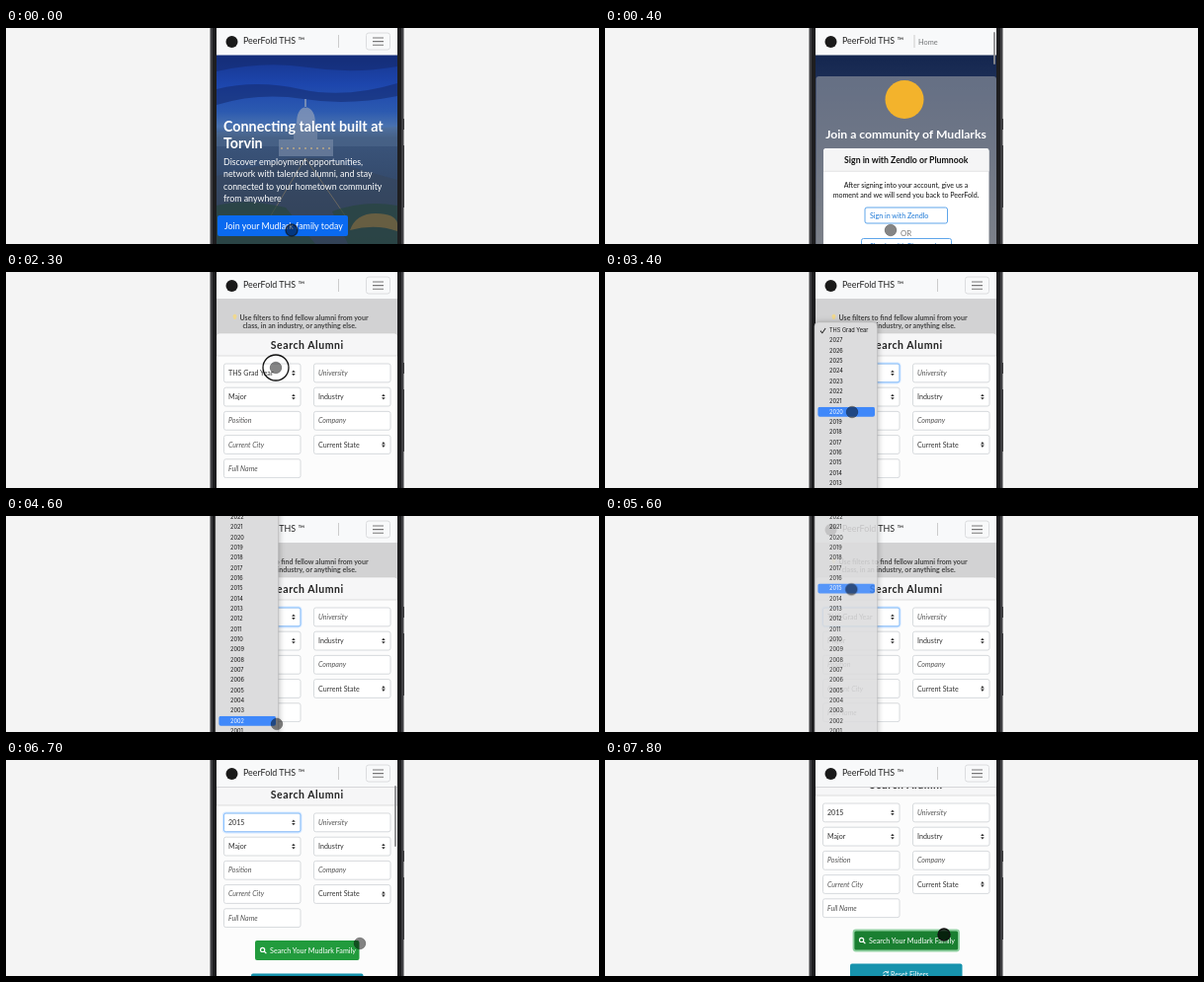
An HTML page for the animation above (8000 ms loop, 600 px wide and 219 px high).

```html
<!DOCTYPE html>
<html lang="en">
<head>
<meta charset="utf-8">
<title>Alumni search walkthrough</title>
<style>
@property --cx { syntax: "<number>"; inherits: true; initial-value: 289 }
@property --cy { syntax: "<number>"; inherits: true; initial-value: 205 }
@property --scroll { syntax: "<number>"; inherits: true; initial-value: 0 }
@property --list { syntax: "<number>"; inherits: true; initial-value: 0 }
@property --row { syntax: "<number>"; inherits: true; initial-value: 100.3 }

html, body { margin: 0; width: 100%; height: 100%; overflow: hidden; background: #f4f4f4 }
svg {
  display: block; width: 600px; height: 219px;
  font: 7.1px Lato, "Open Sans", sans-serif;
  animation: x 8s linear infinite, y 8s linear infinite, scroll 8s linear infinite,
    list 8s linear infinite, row 8s linear infinite;
}
.b { font-weight: 700 }
.i { font-style: italic; fill: #555 }
.m { text-anchor: middle }
.w { fill: #fff }

@keyframes x {
  0%, 6.25% { --cx: 289 }
  10%, 13.75% { --cx: 300 }
  18.75%, 23.75% { --cx: 341 }
  28%, 35% { --cx: 273 }
  42.5%, 50% { --cx: 250 }
  51.25%, 57.5% { --cx: 274 }
  67.5%, 70% { --cx: 249 }
  75%, 77.5% { --cx: 361 }
  80%, 85% { --cx: 358 }
  92.5%, 100% { --cx: 343 }
}
@keyframes y {
  0%, 6.25% { --cy: 205 }
  10%, 13.75% { --cy: 192 }
  18.75%, 23.75% { --cy: 205 }
  28%, 35% { --cy: 97 }
  42.5%, 45% { --cy: 142 }
  47.5%, 50% { --cy: 163 }
  51.25%, 57.5% { --cy: 211 }
  67.5%, 70% { --cy: 74 }
  75%, 77.5% { --cy: 206 }
  80%, 85% { --cy: 186 }
  92.5%, 100% { --cy: 177 }
}
@keyframes scroll {
  0%, 81.25% { --scroll: 0 }
  83.75% { --scroll: -39; animation-timing-function: ease-out }
  92.5%, 100% { --scroll: -49 }
}
@keyframes list {
  0%, 50% { --list: 0 }
  53.75%, 100% { --list: -120 }
}
@keyframes row {
  0% { --row: 100.3 }
  35% { --row: 100.3; animation-timing-function: steps(4) }
  42.5% { --row: 141.6 }
  45% { --row: 141.6; animation-timing-function: steps(2) }
  47.5%, 50% { --row: 162.3 }
  53.75% { --row: 207.6 }
  57.5% { --row: 207.6; animation-timing-function: steps(13) }
  67.5%, 100% { --row: 73.3 }
}

#cursor { transform: translate(calc(var(--cx) * 1px), calc(var(--cy) * 1px)) }
#content { transform: translateY(calc(var(--scroll) * 1px)) }
#sheet { transform: translateY(calc(var(--list) * 1px)) }
#mark { transform: translateY(calc(var(--row) * 1px)); animation: mark 8s step-end infinite }
#mark use { transform: translateY(calc((var(--list) - var(--row)) * 1px)) }
@keyframes mark { 0%, 53.75% { opacity: 1 } 50% { opacity: 0 } }

#landing { animation: landing 8s step-end infinite }
@keyframes landing { 0% { visibility: visible } 1.25%, 100% { visibility: hidden } }
#signin { animation: signin 8s step-end infinite }
@keyframes signin { 0% { visibility: visible } 12.5%, 100% { visibility: hidden } }

#menu { animation: menu 8s linear infinite; filter: drop-shadow(0 1px 3px #0005) }
@keyframes menu {
  0%, 32.49% { opacity: 0 }
  32.5%, 69% { opacity: 1 }
  70% { opacity: .88 }
  72.5%, 100% { opacity: 0 }
}
#before { animation: before 8s step-end infinite }
@keyframes before { 0% { opacity: 1 } 71.25%, 100% { opacity: 0 } }
#after { animation: after 8s step-end infinite }
@keyframes after { 0% { opacity: 0 } 71.25%, 100% { opacity: 1 } }
#focus { animation: focus 8s step-end infinite }
@keyframes focus { 0% { opacity: 0 } 32.5% { opacity: 1 } 95%, 100% { opacity: 0 } }
#press { animation: press 8s step-end infinite }
@keyframes press { 0% { opacity: 0 } 95%, 100% { opacity: 1 } }

#bar1 { animation: bar1 8s linear infinite }
@keyframes bar1 { 0%, 7% { opacity: 1 } 11.25%, 100% { opacity: 0 } }
#bar2 { animation: bar2 8s linear infinite }
@keyframes bar2 { 0%, 82% { opacity: 0 } 82.5%, 89% { opacity: 1 } 92.5%, 100% { opacity: 0 } }

#ring { fill: none; stroke: #111; stroke-width: 1.3; animation: ring 8s linear infinite }
@keyframes ring {
  0% { r: 6px; opacity: .6 }
  1.25%, 9.5% { r: 6px; opacity: 0 }
  10% { r: 6px; opacity: 1 }
  11.25% { r: 13px; opacity: 1 }
  12.5%, 27.4% { r: 6px; opacity: 0 }
  27.5% { r: 6px; opacity: 1 }
  28.75%, 30% { r: 13px; opacity: 1 }
  31.25%, 96.8% { r: 6px; opacity: 0 }
  97%, 100% { r: 6px; opacity: 1 }
}
#dot { animation: dot 8s step-end infinite }
@keyframes dot { 0% { fill-opacity: .48 } 97%, 100% { fill-opacity: .72 } }
</style>
</head>
<body>
<svg viewBox="0 0 600 219">
  <defs>
    <linearGradient id="sky" x2="0" y2="1">
      <stop offset="0" stop-color="#16348c"/>
      <stop offset=".16" stop-color="#1d46ad"/>
      <stop offset=".3" stop-color="#2c5ab0"/>
      <stop offset=".38" stop-color="#4a72ae"/>
      <stop offset=".44" stop-color="#3b557c"/>
      <stop offset=".7" stop-color="#33496a"/>
      <stop offset="1" stop-color="#2b3b4e"/>
    </linearGradient>
    <linearGradient id="dusk" x2="0" y2="1">
      <stop offset="0" stop-color="#14264f"/>
      <stop offset=".12" stop-color="#1b2d55"/>
      <stop offset="1" stop-color="#4d535f"/>
    </linearGradient>
    <clipPath id="screen"><path d="M213 0h183v219h-183z"/></clipPath>
    <clipPath id="line"><rect x="215.4" y="-4.9" width="57.6" height="10" rx="2"/></clipPath>
    <g id="brand">
      <path d="M213 0h183v27.5h-183z" fill="#f8f9fa"/>
      <circle cx="228.5" cy="14" r="6" fill="#1a1a1a"/>
      <text x="240" y="16" font-size="8.9" fill="#222">PeerFold THS ™</text>
    </g>
    <g id="nav" fill="none">
      <use href="#brand"/>
      <path d="M336.5 7v13" stroke="#ccc"/>
      <rect x="364.5" y="5" width="24" height="17" rx="2.5" stroke="#dcdddf"/>
      <path d="M371 10h11m-11 3.6h11m-11 3.6h11" stroke="#777" stroke-width="1.1"/>
    </g>
    <g id="rows"></g>
  </defs>

  <path d="M0 0h600v219H0z" fill="#f4f4f4"/>
  <path d="M401 92h2v11h-2zm0 27h2v63h-2z" fill="#3a3a3c"/>
  <path d="M206.5 0h196v219h-196z" fill="#3e3e41"/>
  <path d="M209 0h191v219h-191z" fill="#1e1e20"/>

  <g clip-path="url(#screen)">
    <g id="search">
      <path d="M213 0h183v219h-183z" fill="#fcfcfc"/>
      <g id="content">
        <path d="M213 27h183v40h-183z" fill="#d2d2d3"/>
        <path d="M230.6 48l-.4-1.6a2 2 0 1 1 2.6 0l-.4 1.6z" fill="#f0d88e"/>
        <g class="b m" fill="#444" font-size="7.05">
          <text x="301.5" y="48.5">Use filters to find fellow alumni from your</text>
          <text x="297" y="57.3">class, in an industry, or anything else.</text>
        </g>
        <path d="M213 85V65q0-3 3-3h177q3 0 3 3v20z" fill="#f6f6f7" stroke="#c9c9ca" stroke-width=".6"/>
        <text class="b m" x="304.8" y="77.7" font-size="10.5" letter-spacing=".55" fill="#222">Search Alumni</text>
        <g id="fields" fill="#333"></g>
        <g id="focus" fill="none">
          <rect x="219.7" y="92.2" width="79" height="20.4" rx="3" stroke="#d5e8ff" stroke-width="1.6"/>
          <rect x="220.5" y="93" width="77.5" height="18.8" rx="2" stroke="#80bdff" stroke-width=".9"/>
        </g>
        <rect x="252" y="222" width="105.5" height="20" rx="2" fill="#229b3d"/>
        <rect id="press" x="251.5" y="221.5" width="106.5" height="21" rx="2.5" fill="#1a7f31" stroke="#8fd0a0" stroke-width="1.8"/>
        <g fill="none" stroke="#fff" stroke-width="1.2">
          <circle cx="259.6" cy="231.4" r="2.1"/>
          <path d="M261.2 233l2.2 2.2"/>
        </g>
        <text class="w" x="267" y="234.6" font-size="7.2">Search Your Mudlark Family</text>
        <rect x="248" y="255.5" width="113.5" height="21" rx="2" fill="#1793ad"/>
        <g fill="none" stroke="#fff">
          <path d="M281.6 265.4a2.6 2.6 0 0 1 4.6-.8m.6 2a2.6 2.6 0 0 1-4.6.8"/>
          <path d="M286.6 262.8v2h-2m-2.8 4.4v-2h2" stroke-width=".8"/>
        </g>
        <text class="w" x="289" y="268.6">Reset Filters</text>
      </g>
      <use href="#nav"/>
      <path d="M213 27.5h183" stroke="#cfcfd1" stroke-width=".8"/>
      <path id="bar2" d="M394 27v60" stroke="#8d8d8f" stroke-width="1.8" stroke-linecap="round"/>
    </g>

    <g id="signin">
      <path d="M213 27h183v192h-183z" fill="url(#dusk)"/>
      <path d="M213.5 219V52q0-3 3-3H393q3 0 3 3v167z" fill="#a3a6ab" fill-opacity=".55"/>
      <circle cx="303" cy="72.5" r="19.5" fill="#f3b32c"/>
      <text class="b m w" x="304.5" y="112" font-size="12.2">Join a community of Mudlarks</text>
      <rect x="221" y="122" width="167.5" height="110" rx="3" fill="#fff"/>
      <path d="M221 145v-20q0-3 3-3h161.5q3 0 3 3v20z" fill="#f5f5f6"/>
      <path d="M221 145.3h167.5" stroke="#d9d9da" stroke-width=".7"/>
      <g class="m" fill="#111">
        <text class="b" x="304.7" y="136.5" font-size="8.7">Sign in with Zendlo or Plumnook</text>
        <text x="304.5" y="161.5">After signing into your account, give us a</text>
        <text x="304.5" y="172.3">moment and we will send you back to PeerFold.</text>
        <text x="304.5" y="211" font-size="7.8" fill="#777">OR</text>
      </g>
      <g fill="#fff" stroke="#4c9be8" stroke-width=".9">
        <rect x="263" y="182" width="83.5" height="16" rx="2"/>
        <rect x="259.5" y="213.5" width="91" height="16" rx="2"/>
      </g>
      <g fill="#1c78d6">
        <text x="268" y="192.7">Sign in with Zendlo</text>
        <text x="268" y="224">Sign in with Plumnook</text>
      </g>
      <use href="#brand"/>
      <path d="M313 7v13" stroke="#ccc"/>
      <text x="317" y="16.5" font-size="7.4" fill="#747678">Home</text>
      <path id="bar1" d="M394 5v31" stroke="#8d8d8f" stroke-width="1.8" stroke-linecap="round"/>
    </g>

    <g id="landing">
      <path d="M213 27h183v192h-183z" fill="url(#sky)"/>
      <g fill="#14296b" opacity=".55">
        <path d="M213 27h183v12q-45 8-90 1t-93 4z"/>
        <path d="M213 62q40-10 85 0t98-6v13q-50 10-95 3t-88 6z"/>
      </g>
      <path d="M213 106q40-6 90-4t93-2v20h-183z" fill="#566f92" opacity=".45"/>
      <path d="M213 150l75-18h30l78 22v65h-183z" fill="#37465c" opacity=".6"/>
      <path d="M276 113h55v17h-55zm15-16h24v17h-24z" fill="#7688a5" opacity=".7"/>
      <path d="M294 97q0-15 9-17q10 2 10 17zm8-16h2v-9h-2z" fill="#8799b8" opacity=".8"/>
      <path d="M278 122h51" stroke="#d0b584" stroke-width="2" stroke-dasharray="2 4" opacity=".6"/>
      <path d="M303 132l-35 58m35-58l40 58" stroke="#cda766" opacity=".35"/>
      <path d="M213 180q30-8 70 2l30 37h-100zm183 0q-34-6-66 6l16 33h50z" fill="#27463c" opacity=".65"/>
      <path d="M348 205q6-17 26-17t22 10v8q-22-8-48-1z" fill="#a4793f" opacity=".5"/>
      <g class="w">
        <g class="b" font-size="14.3">
          <text x="220" y="105">Connecting talent built at</text>
          <text x="220" y="122">Torvin</text>
        </g>
        <g font-size="8.85">
          <text x="220" y="138.5">Discover employment opportunities,</text>
          <text x="220" y="151">network with talented alumni, and stay</text>
          <text x="220" y="163.5">connected to your hometown community</text>
          <text x="220" y="176">from anywhere</text>
        </g>
      </g>
      <rect x="214" y="190" width="132" height="21" rx="2" fill="#0a6af0"/>
      <text class="w" x="221" y="203.6" font-size="8.9">Join your Mudlark family today</text>
      <use href="#nav"/>
    </g>
  </g>

  <g id="menu" font-family="Inter, Roboto, sans-serif" font-size="5.6">
    <g id="sheet">
      <rect x="212" y="51" width="63.5" height="420" rx="4" fill="#dcdcdd" stroke="#b5b5b6" stroke-width=".5"/>
      <use href="#rows" fill="#111"/>
    </g>
    <g id="mark" clip-path="url(#line)">
      <path d="M215-5h59V6h-59z" fill="#3f88fa"/>
      <use href="#rows" fill="#fff"/>
    </g>
  </g>

  <g id="cursor">
    <circle id="dot" r="5.8" fill="#000" fill-opacity=".48" stroke="#000" stroke-opacity=".4" stroke-width=".8"/>
    <circle id="ring" r="6"/>
  </g>
</svg>
<script>
const $ = id => document.getElementById(id);
const text = (x, y, s, attrs = "") => `<text x="${x}" y="${y}" ${attrs}>${s}</text>`;

// Names ending in * are drop-downs, the others are text inputs.
const columns = [
  [220.5, ["THS Grad Year*", "Major*", "Position", "Current City", "Full Name"]],
  [311.5, ["University", "Industry*", "Company", "Current State*"]]
];

function field(x, y, name) {
  const select = name.endsWith("*"), label = name.replace("*", "");
  const box = `<rect x="${x}" y="${y - 9.4}" width="77.5" height="18.8" rx="2" fill="#fff" stroke="#cdd1d5" stroke-width=".8"/>`;
  if (!select) return box + text(x + 4.5, y + 2.5, label, 'class="i"');
  const arrows = `<path d="M${x + 68.6} ${y - .6}l1.8-2.3 1.8 2.3zm0 1.2l1.8 2.3 1.8-2.3z"/>`;
  const first = label.startsWith("THS");
  return box + arrows + text(x + 4.5, y + 2.5, label, first ? 'id="before"' : "") +
    (first ? text(x + 4.5, y + 2.5, "2015", 'id="after"') : "");
}

$("fields").innerHTML = columns.map(([x, names]) =>
  names.map((name, i) => field(x, 102.4 + i * 24.2, name)).join("")).join("");

const labels = ["THS Grad Year"];
for (let year = 2027; year > 1992; year--) labels.push(year);
$("rows").innerHTML = '<path d="M218.3 59.3l1.5 1.9 3-4.5.7.5-3.6 5.4-2.3-2.7z"/>' +
  labels.map((s, i) => text(227, 61 + i * 10.33, s)).join("");
</script>
</body>
</html>
```
